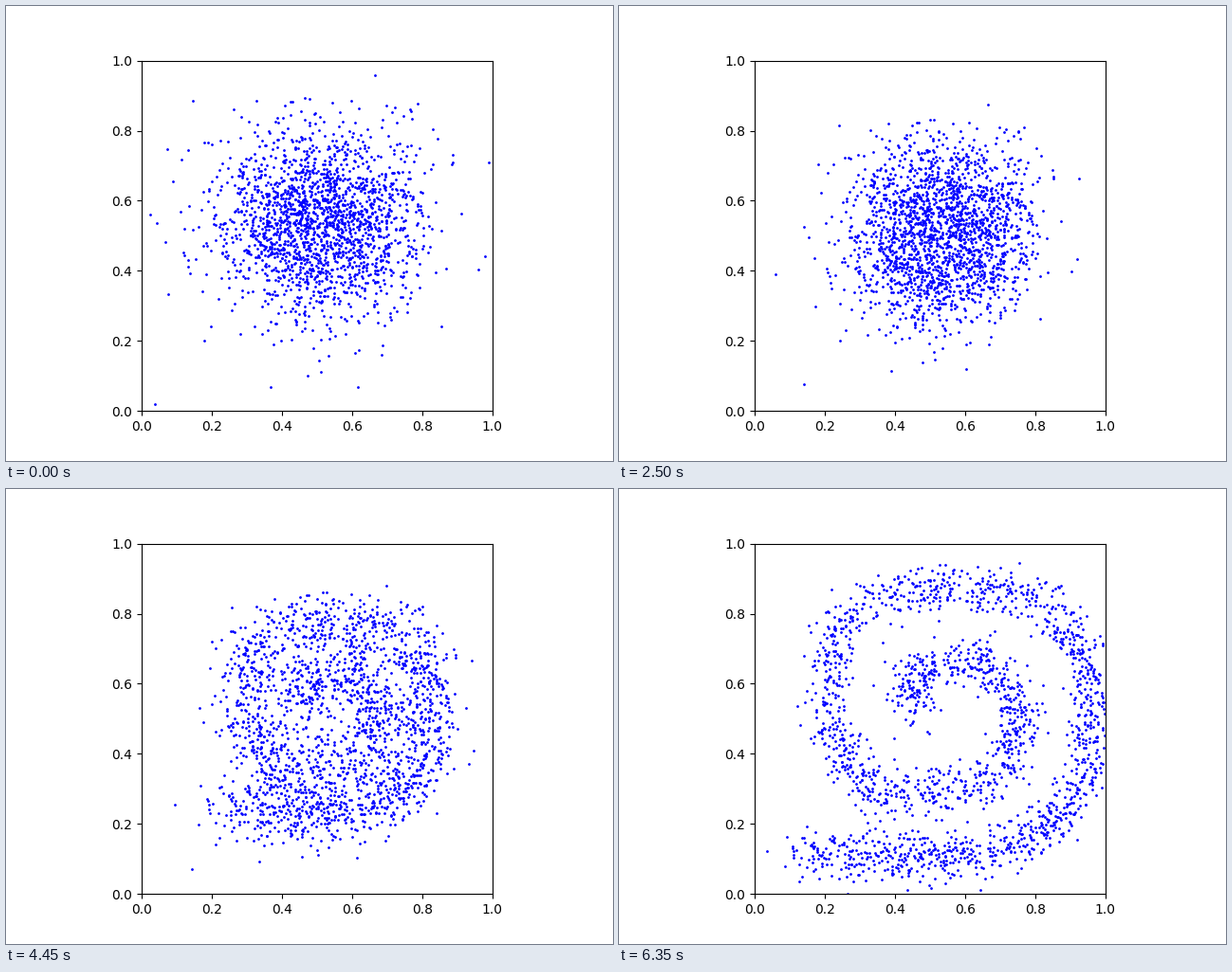
Animation, 640 px wide and 480 px high, one loop 6.4 s. Source, as a matplotlib script:

```python
import numpy as np
import matplotlib.pyplot as plt
from matplotlib.animation import FuncAnimation

FRAMES, INTERVAL = 128, 50
COUNT = 2000
MEAN = np.array([0.502, 0.54])
SPREAD = np.array([0.146, 0.133])
NOISE = 0.035


def spiral():
    """Clockwise spiral with squarish corners and a straight tail."""
    turn = np.linspace(-1, 6, 300)          # quarter turns from the top
    phi = turn * np.pi / 2
    r = np.interp(turn, [-1, 0, 1, 3, 6], [.08, .118, .185, .295, .425])
    r *= 1 + (0.085 - 0.035 * np.sin(phi)) * np.sin(2 * phi)**2
    x = 0.54 + 1.1 * r * np.sin(phi)
    y = 0.535 + r * np.cos(phi)
    tail = np.linspace(x[-1], 0.14, 40)[1:]
    return np.r_[x, tail], np.r_[y, np.full_like(tail, y[-1])]


def spiral_nodes(n=170):
    """Points along the spiral, packed closer near both ends."""
    x, y = spiral()
    length = np.r_[0, np.cumsum(np.hypot(np.diff(x), np.diff(y)))]
    u = np.linspace(0, 1, n)
    s = (0.8 * u + 0.2 * u**2 * (3 - 2 * u)) * length[-1]
    return np.column_stack([np.interp(s, length, c) for c in (x, y)])


def cloud():
    rng = np.random.default_rng(4)
    return MEAN + SPREAD * rng.normal(size=(COUNT, 2))


def velocity(p, t, nodes):
    """Mean velocity of straight paths from the cloud to the spiral."""
    var = (t * NOISE)**2 + ((1 - t) * SPREAD)**2
    rate = (t * NOISE**2 - (1 - t) * SPREAD**2) / var
    centres = t * nodes + (1 - t) * MEAN
    a, b = p / np.sqrt(var), centres / np.sqrt(var)
    logit = a @ b.T - 0.5 * (b**2).sum(1)
    w = np.exp(logit - logit.max(1, keepdims=True))
    goal = w @ nodes / w.sum(1, keepdims=True)
    return goal - MEAN + rate * (p - t * goal - (1 - t) * MEAN)


def trajectory():
    nodes, p = spiral_nodes(), cloud()
    dt = 1 / (FRAMES - 1)
    path = [p]
    for k in range(FRAMES - 1):
        p = p + dt * velocity(p, (k + 0.5) * dt, nodes)
        path.append(p)
    return path


path = trajectory()

fig, ax = plt.subplots(figsize=(6.4, 4.8), dpi=100)
ax.set(xlim=(0, 1), ylim=(0, 1), aspect="equal")
dots, = ax.plot(*path[0].T, "o", color="blue", markersize=1)


def update(i):
    dots.set_data(*path[i].T)
    return dots,


anim = FuncAnimation(fig, update, frames=FRAMES, interval=INTERVAL,
                     repeat=True, repeat_delay=0)
plt.show()
```
